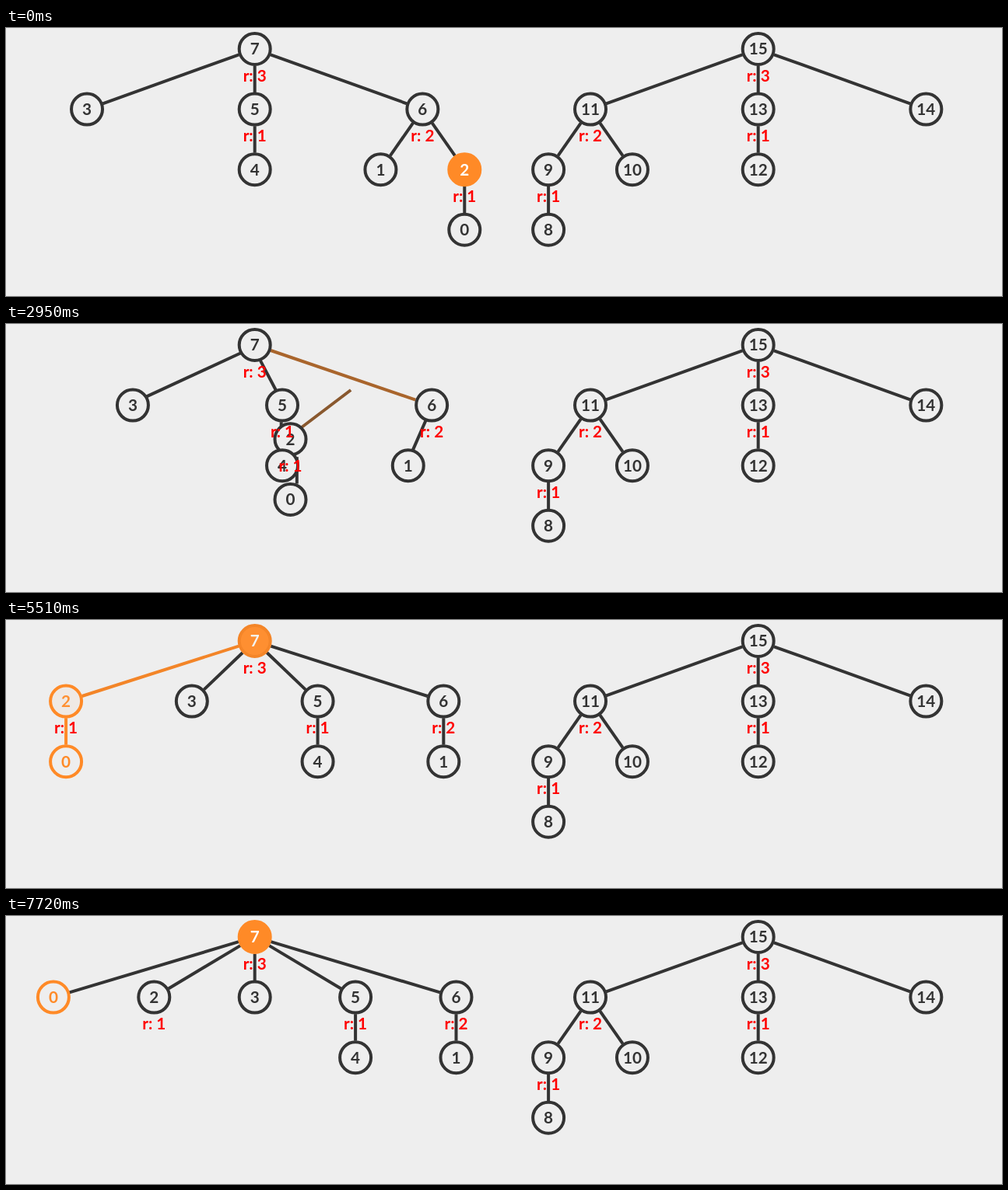
An HTML page for the animation above (8000 ms loop, 1280x345 px).

```html
<!DOCTYPE html>
<html lang="en">
<head>
<meta charset="utf-8">
<title>Disjoint sets with path compression</title>
<style>
  html, body { margin: 0; width: 100%; height: 100%; overflow: hidden; background: #eee; }
  svg { display: block; width: 1280px; height: 345px; }
  line, circle { stroke-width: 4; }
  text { font: 700 20.7px Lato, "Open Sans", sans-serif; text-anchor: middle; }
  .rank { fill: #f00; }
</style>
</head>
<body>
<svg viewBox="0 0 1280 345"></svg>
<script>
const LOOP = 8000, STEP = 519, DURATION = 500, EDGE_LAG = 3;
const RADIUS = 20, TRIM = 21.6;
const LEFT = -3.8, TREE_WIDTH = 647, TOP = 27, ROW = 77.6;
const DARK = [51, 51, 51], ORANGE = [255, 138, 39], PAPER = [238, 238, 238], WHITE = [255, 255, 255];

const PLAIN = { stroke: DARK, fill: PAPER, text: DARK };
const WALKED = { stroke: ORANGE, fill: PAPER, text: ORANGE };
const CURRENT = { stroke: ORANGE, fill: ORANGE, text: WHITE };

// Binomial trees with roots 7 and 15; the left one has a few labels swapped
const ids = [...Array(16).keys()];
const parent = ids.map(i => i % 8 === 7 ? i : i | (i + 1));
Object.assign(parent, [2, 6, 6, 7]);

const childrenOf = i => ids.filter(c => c !== i && parent[c] === i);
const height = i => Math.max(0, ...childrenOf(i).map(c => height(c) + 1));
const ranks = ids.map(height);

// Every child gets an equal share of its parent's width
function layOut() {
  const nodes = [];
  function place(i, left, width, y) {
    nodes[i] = { x: left + width / 2, y };
    const children = childrenOf(i), share = width / children.length;
    children.forEach((c, k) => place(c, left + k * share, share, y + ROW));
  }
  place(7, LEFT, TREE_WIDTH, TOP);
  place(15, LEFT + TREE_WIDTH, TREE_WIDTH, TOP);

  const edges = nodes.map((a, i) => {
    if (parent[i] === i) return null;
    const b = nodes[parent[i]];
    const angle = Math.atan2(b.y - a.y, b.x - a.x);
    const dx = TRIM * Math.cos(angle), dy = TRIM * Math.sin(angle);
    return [a.x + dx, a.y + dy, b.x - dx, b.y - dy];
  });
  return { nodes, edges };
}

const steps = [];

// Walk up to the root, then hang each vertex of the path directly below it
function find(vertex, mid) {
  const addStep = (current, walked = [], orangeEdges = []) => {
    steps.push({
      start: mid - DURATION / 2,
      style: i => i === current ? CURRENT : walked.includes(i) ? WALKED : PLAIN,
      edgeColor: i => orangeEdges.includes(i) ? ORANGE : DARK,
      ...layOut()
    });
    mid += STEP;
  };

  const path = [vertex];
  while (parent[path.at(-1)] !== path.at(-1)) path.push(parent[path.at(-1)]);
  const root = path.at(-1);

  path.forEach((v, k) => addStep(v, path.slice(0, k), path.slice(0, k)));
  addStep(root);
  for (const v of path.slice(0, -1).reverse()) {
    parent[v] = root;
    addStep(null, [], [v]);
  }
  addStep(root, [vertex]);
}

find(2, 367);
find(0, 4341);

const svg = document.querySelector('svg');
function set(el, attrs) {
  for (const key in attrs) el.setAttribute(key, attrs[key]);
}
function add(tag, attrs = {}, content = '') {
  const el = document.createElementNS('http://www.w3.org/2000/svg', tag);
  el.textContent = content;
  set(el, attrs);
  return svg.appendChild(el);
}

const lines = ids.map(i => steps[0].edges[i] && add('line'));
const circles = ids.map(() => add('circle', { r: RADIUS }));
const names = ids.map(i => add('text', {}, i));
const rankLabels = ranks.map(r => r && add('text', { class: 'rank' }, 'r: ' + r));

const mix = (a, b, p) => a + (b - a) * p;
const mixAll = (a, b, p) => a.map((v, k) => mix(v, b[k], p));
const color = (a, b, p) => `rgb(${mixAll(a, b, p).map(Math.round)})`;

function cubicInOut(t) {
  t = Math.min(1, Math.max(0, t));
  return t < 0.5 ? 4 * t ** 3 : 1 - 4 * (1 - t) ** 3;
}

function draw(time) {
  const n = Math.max(0, steps.findLastIndex(s => s.start <= time));
  const to = steps[n], from = steps[Math.max(0, n - 1)];
  const p = cubicInOut((time - to.start) / DURATION);
  const q = cubicInOut((time - to.start - EDGE_LAG) / DURATION);

  for (const i of ids) {
    const x = mix(from.nodes[i].x, to.nodes[i].x, p);
    const y = mix(from.nodes[i].y, to.nodes[i].y, p);
    const a = from.style(i), b = to.style(i);
    set(circles[i], {
      cx: x, cy: y,
      fill: color(a.fill, b.fill, p),
      stroke: color(a.stroke, b.stroke, p)
    });
    set(names[i], { x, y: y + 7.3, fill: color(a.text, b.text, p) });
    if (rankLabels[i]) set(rankLabels[i], { x, y: y + 41.8 });
    if (lines[i]) {
      const [x1, y1, x2, y2] = mixAll(from.edges[i], to.edges[i], q);
      set(lines[i], { x1, y1, x2, y2, stroke: color(from.edgeColor(i), to.edgeColor(i), q) });
    }
  }
}

function tick(now) {
  draw(now % LOOP);
  requestAnimationFrame(tick);
}
draw(0);
requestAnimationFrame(tick);
</script>
</body>
</html>
```
